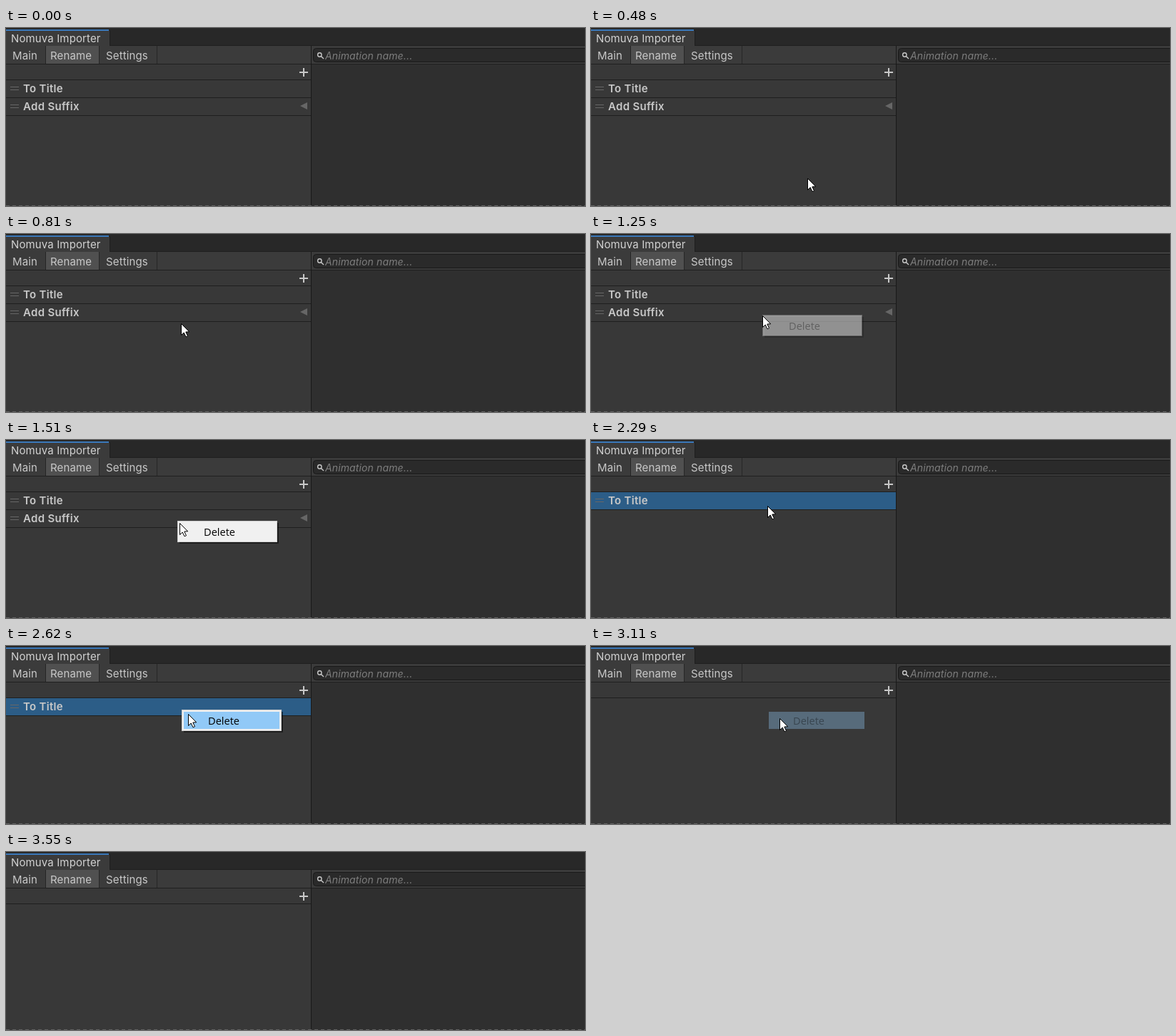
These frames come from a looping animation (811x249 px, 4.14 s). An HTML page with a canvas:

```html
<!DOCTYPE html>
<html lang="en">
<head>
<meta charset="utf-8">
<title>Rename list</title>
<style>
  html, body { margin: 0; width: 100%; height: 100%; overflow: hidden; background: #383838; }
  canvas { display: block; }
</style>
</head>
<body>
<canvas id="stage" width="811" height="249"></canvas>
<script>
const ctx = document.getElementById('stage').getContext('2d');
const W = 811, H = 249, SPLIT = 427, LOOP = 4140;
const UI = 'Inter, Roboto, sans-serif';
const LINE = '#1f1f1f', BAR = '#3b3b3b', GREY = '#c8c8c8';
const FADE_IN = 180, FADE_OUT = 280;

// Context menus: corner, then times of pointer arrival, opening, hover and click
const menus = [
  { x: 240, y: 113, at: 930, open: 1190, hover: 1517, click: 1730 },
  { x: 246, y: 89, at: 2330, open: 2400, hover: 2600, click: 2930 }
];

// Pointer stops; both menus share one gesture: arrive, wait, slide onto the item, click
const stops = [
  { t: 380, x: 330, y: H },
  { t: 810, x: 245, y: 125, ease: 1.4 },
  ...menus.flatMap(({ x, y, at, hover, click }) => [
    { t: at, x, y: y + 1 },
    { t: hover - 20, x, y: y + 1 },
    { t: hover + 90, x: x + 17, y: y + 10, ease: 1.5 },
    { t: click, x: x + 17, y: y + 10 }
  ]),
  { t: 3110, x: 264, y: 101 },
  { t: 3550, x: 447, y: H }
];

const clamp = v => Math.max(0, Math.min(1, v));

function pointerAt(t) {
  const i = stops.findIndex(s => s.t > t);
  if (i < 1) return [0, H];
  const a = stops[i - 1], b = stops[i];
  const e = 1 - (1 - (t - a.t) / (b.t - a.t)) ** (b.ease || 1);
  return [a.x + (b.x - a.x) * e, a.y + (b.y - a.y) * e].map(Math.round);
}

function rect(x, y, w, h, color) {
  ctx.fillStyle = color;
  ctx.fillRect(x, y, w, h);
}

function text(str, x, y, color, font, spacing = 0.13) {
  ctx.font = font;
  ctx.letterSpacing = spacing + 'px';
  ctx.fillStyle = color;
  ctx.fillText(str, x, y);
}

function poly(points, color) {
  ctx.beginPath();
  points.forEach(([x, y]) => ctx.lineTo(x, y));
  ctx.closePath();
  ctx.fillStyle = color;
  ctx.fill();
}

function drawTabs() {
  rect(0, 0, W, 25, '#282828');
  rect(0, 4, 145, 21, BAR);
  rect(0, 2, 144, 2, '#3a79bb');
  rect(145, 3, 1, 22, LINE);
  rect(145, 24, W, 1, LINE);
  text('Nomuva Importer', 7, 20, '#d2d2d2', '15px ' + UI);

  rect(0, 25, W, 25, BAR);
  rect(55, 25, 75, 25, '#505050');
  for (const x of [55, 130, 211]) rect(x, 25, 1, 25, '#262626');
  text('Main', 9, 44, GREY, '15px ' + UI);
  text('Rename', 62, 44, GREY, '15px ' + UI);
  text('Settings', 140, 44, GREY, '15px ' + UI);
}

function drawSearch() {
  ctx.beginPath();
  ctx.roundRect(430.5, 28.5, 400, 19, 4);
  ctx.fillStyle = '#2a2a2a';
  ctx.fill();
  ctx.strokeStyle = '#191919';
  ctx.lineWidth = 1;
  ctx.stroke();

  ctx.strokeStyle = GREY;
  ctx.lineWidth = 1.4;
  ctx.beginPath();
  ctx.arc(439.3, 37.5, 2.7, 0, Math.PI * 2);
  ctx.moveTo(441.3, 39.5);
  ctx.lineTo(445, 43);
  ctx.stroke();
  text('Animation name...', 447, 44, '#7d7d7d', 'italic 14px ' + UI);
}

function drawRow(y, label, selected) {
  if (selected) rect(0, y, SPLIT, 24, '#2c5d87');
  rect(0, y + 24, SPLIT, 1, LINE);
  for (const dy of [9, 13]) rect(6, y + dy, 12, 1, '#666666');
  text(label, 24, y + 17, GREY, '600 15px ' + UI, 0.3);
}

function drawPanel(t) {
  rect(0, 50, SPLIT, H, '#383838');
  rect(SPLIT, 50, W, H, '#2f2f2f');
  rect(0, 50, W, 1, LINE);
  rect(0, 72, SPLIT, 1, LINE);
  rect(411, 61, 12, 2, GREY);
  rect(416, 56, 2, 12, GREY);

  const [first, second] = menus.map(m => t >= m.click + 30);
  if (!second) drawRow(73, 'To Title', first);
  if (!first) {
    drawRow(98, 'Add Suffix', false);
    poly([[412, 109], [422, 104], [422, 114]], '#666666');
  }

  rect(SPLIT, 25, 1, H, '#191919');
  for (let x = 0; x < W; x += 9) rect(x, H - 1, 5, 1, '#606060');
}

function drawMenu({ x, y, open, hover, click }, t) {
  const closing = t >= click;
  ctx.save();
  ctx.globalAlpha = closing ? 1 - clamp((t - click) / FADE_OUT) : clamp((t - open) / FADE_IN);
  if (!closing) {
    for (const d of [2, 1]) rect(x + 3, y + 3, 137 + d, 27 + d, 'rgba(0,0,0,.4)');
    rect(x, y, 140, 30, '#cccccc');
    rect(x + 1, y + 1, 138, 28, '#f0f0f0');
  }
  if (t >= hover) rect(x + 3, y + 3, 134, 24, '#91c9f7');
  text('Delete', x + 37, y + 21, '#000', '14.6px "Open Sans", "Noto Sans", sans-serif', 0);
  ctx.restore();
}

function drawPointer(x, y) {
  if (y >= H) return;
  ctx.save();
  ctx.translate(x + 0.5, y + 0.5);
  poly([[0, 0], [0, 16], [3.7, 12.5], [6.5, 18.3], [9, 17.2], [6.3, 11.5], [11.2, 11.3]], '#fff');
  ctx.strokeStyle = '#000';
  ctx.lineWidth = 1;
  ctx.stroke();
  ctx.restore();
}

function draw(t) {
  drawTabs();
  drawSearch();
  drawPanel(t);
  menus.forEach(m => drawMenu(m, t));
  drawPointer(...pointerAt(t));
}

const start = performance.now();
function tick() {
  draw((performance.now() - start) % LOOP);
  requestAnimationFrame(tick);
}
tick();
</script>
</body>
</html>
```
